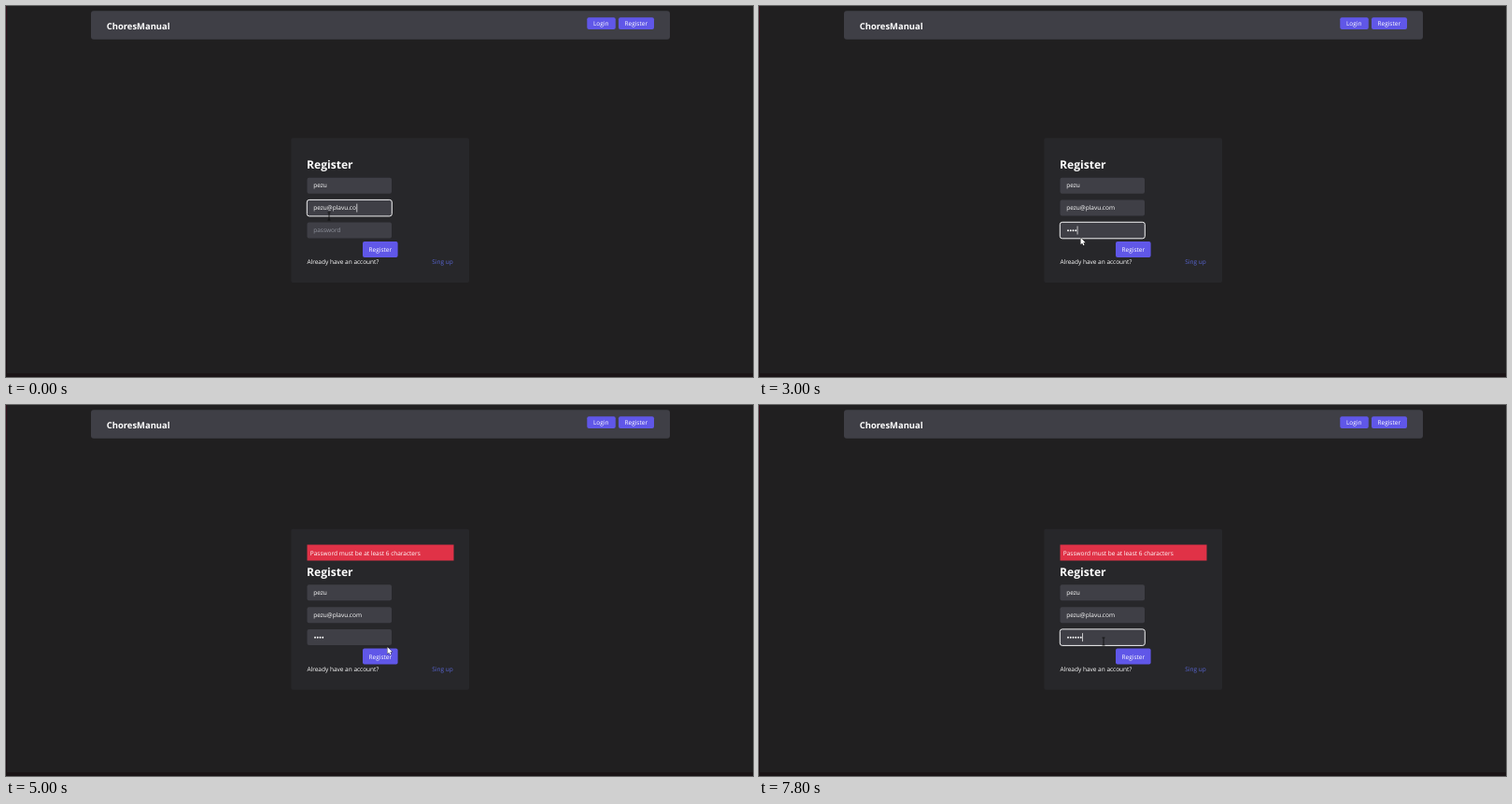
Write an HTML page with a canvas that moves like this. It is 800 px wide and 397 px high and loops after 8 s.

```html
<!DOCTYPE html>
<html lang="en">
<head>
<meta charset="utf-8">
<title>Register form</title>
<style>
  html, body { margin: 0; width: 100%; height: 100%; overflow: hidden; background: #201f20; }
  canvas { display: block; width: 800px; height: 397px; }
</style>
</head>
<body>
<canvas></canvas>
<script>
const canvas = document.querySelector('canvas');
const ctx = canvas.getContext('2d');
const ratio = window.devicePixelRatio || 1;
canvas.width = 800 * ratio;
canvas.height = 397 * ratio;
ctx.scale(ratio, ratio);
ctx.textRendering = 'geometricPrecision';

const LOOP = 8000, STEP = 200, BLINK = 530;
const ERROR_AT = 5000, ERROR_SHIFT = 8.6;
const PANEL = '#3f3f46', INDIGO = '#6057e8';
const DOT_TIMES = [1800, 2200, 2400, 2800, 7400, 7600];

// time, x, y, pointer shape until the next point
const pointerPath = [
  [0, 346, 225, 'beam'], [200, 346, 225, 'beam'], [1200, 357, 244, 'beam'],
  [2400, 357, 244, 'beam'], [2800, 344.5, 248, 'arrow'], [3600, 344.5, 248, 'arrow'],
  [4400, 411, 261, 'hand'], [5000, 408.5, 259, 'arrow'], [5600, 408.5, 259, 'arrow'],
  [6000, 372, 257, 'beam'], [6200, 370, 257, 'beam'], [6600, 369, 251, 'beam'],
  [7000, 369, 253, 'beam'], [LOOP, 369, 253, 'beam']
];

const shapes = {
  arrow: new Path2D('M0 0V7.2L1.7 5.7L2.8 8.2L4 7.7L2.9 5.3H5.2Z'),
  hand: new Path2D('M0 .6Q.7-.4 1.4 .6V3.2Q2.2 2.8 2.7 3.5Q3.5 3.1 3.9 3.9Q5 3.7 5 4.7V6.3L4.2 8.6H.5L-1.7 5.5Q-1.4 4.5-.4 5.2L0 5.6Z'),
  beam: new Path2D('M-1.5-4H1.5M0-4V4M-1.5 4H1.5')
};

function box(x, y, w, h, radius, color) {
  ctx.beginPath();
  ctx.roundRect(x, y, w, h, radius);
  ctx.fillStyle = color;
  ctx.fill();
}

function text(str, x, baseline, color = '#fff', size = 6.5, weight = 400) {
  ctx.font = `${weight} ${size}px "Open Sans", "Noto Sans", sans-serif`;
  ctx.fillStyle = color;
  ctx.fillText(str, x, baseline);
}

function button(label, x, y, w, h, textX) {
  box(x, y, w, h, 2, INDIGO);
  text(label, textX, y + h / 2 + 2.4);
}

function input(y, focused) {
  box(322.5, y, 90.5, 17, 2, PANEL);
  if (!focused) return;
  ctx.beginPath();
  ctx.roundRect(322.3, y - .2, 91, 17.5, 2.5);
  ctx.strokeStyle = '#f4f4f5';
  ctx.lineWidth = 1;
  ctx.stroke();
}

function caret(x, y) {
  ctx.fillStyle = '#fff';
  ctx.fillRect(x, y + 4, .7, 9);
}

function backdrop() {
  ctx.fillStyle = '#201f20';
  ctx.fillRect(0, 0, 800, 397);
  const edge = ctx.createLinearGradient(0, 0, 0, 397);
  edge.addColorStop(0, '#35101c');
  edge.addColorStop(.25, '#21101c');
  edge.addColorStop(.4, '#14142a');
  edge.addColorStop(1, '#1c1014');
  ctx.fillStyle = edge;
  ctx.fillRect(0, 0, 1, 397);
  ctx.fillStyle = '#1a1416';
  ctx.fillRect(0, 393, 800, 4);
}

function header() {
  box(91, 5.3, 620, 30.5, 3, PANEL);
  text('ChoresManual', 107.7, 24.5, '#fff', 9.43, 700);
  button('Login', 622.3, 12.3, 30.5, 12.7, 629);
  button('Register', 656, 12.3, 38, 12.7, 662.5);
}

function form(t) {
  const failed = t >= ERROR_AT;
  const dots = DOT_TIMES.filter(time => time <= t).length;
  const emailFocused = t < 800;
  const passwordFocused = t >= 800 && t < ERROR_AT || t >= 6600;
  const lastKey = Math.max(...[0, 200, 800, 6600, ...DOT_TIMES].filter(time => time <= t));
  const caretOn = (t - lastKey) % (2 * BLINK) < BLINK;

  ctx.save();
  if (failed) {
    box(305.3, 132.7, 190.7, 172, 2, '#27272a');
    box(322.5, 149.6, 157, 17, 0, '#e03247');
    text('Password must be at least 6 characters', 325.8, 160.5);
    ctx.translate(0, ERROR_SHIFT);
  } else {
    box(305.3, 141.2, 190.7, 154.8, 2, '#27272a');
  }

  text('Register', 322, 174.4, '#fff', 12.1, 700);
  input(183.7, false);
  text('pezu', 329.2, 194.4);

  input(207.6, emailFocused);
  text(t < 200 ? 'pezu@plavu.co' : 'pezu@plavu.com', 329.2, 218.4);
  if (emailFocused && caretOn) caret(t < 200 ? 375.5 : 381.5, 207.6);

  input(231.5, passwordFocused);
  if (!dots) text('password', 329.2, 242.4, '#8f929c');
  ctx.fillStyle = '#fff';
  for (let i = 0; i < dots; i++) {
    ctx.beginPath();
    ctx.arc(331 + 2.75 * i, 240.2, .95, 0, 2 * Math.PI);
    ctx.fill();
  }
  if (passwordFocused && caretOn) caret(329.7 + 2.75 * dots, 231.5);

  button('Register', 382, 252, 37.6, 17, 388.6);
  text('Already have an account?', 322.4, 276.4);
  text('Sing up', 456.2, 276.4, '#5865d2');
  ctx.restore();
}

function pointer(t) {
  const next = pointerPath.findIndex(point => point[0] > t);
  const [t0, x0, y0, kind] = pointerPath[next - 1];
  const [t1, x1, y1] = pointerPath[next];
  const k = (t - t0) / (t1 - t0);
  ctx.save();
  ctx.translate(x0 + (x1 - x0) * k, y0 + (y1 - y0) * k);
  ctx.strokeStyle = '#111';
  ctx.lineWidth = kind === 'beam' ? .9 : .7;
  ctx.stroke(shapes[kind]);
  if (kind !== 'beam') {
    ctx.fillStyle = '#fff';
    ctx.fill(shapes[kind]);
  }
  ctx.restore();
}

function draw() {
  const t = Math.floor(performance.now() % LOOP / STEP) * STEP;
  backdrop();
  header();
  form(t);
  pointer(t);
  requestAnimationFrame(draw);
}
draw();
</script>
</body>
</html>
```
